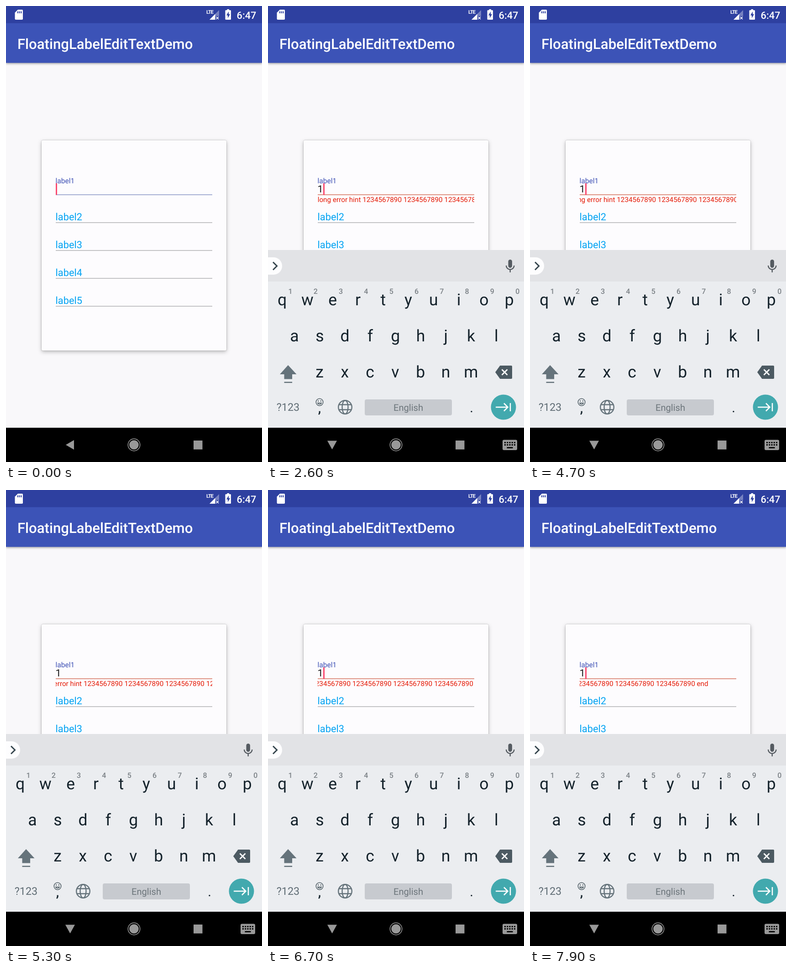
An HTML page that plays this animation: 561x998 px, repeating every 8 s.

```html
<!DOCTYPE html>
<html lang="en">
<head>
<meta charset="utf-8">
<title>Floating label demo</title>
<style>
  html, body { margin: 0; width: 100%; height: 100%; overflow: hidden; background: #f9f8fa; }
  svg { display: block; width: 561px; height: 998px; }
  text { font-family: Roboto, "Noto Sans", sans-serif; text-rendering: geometricPrecision; white-space: pre; }
  .bar { filter: drop-shadow(0 2px 2px rgba(0, 0, 0, .32)); }
  .card { filter: drop-shadow(0 0 1px rgba(0, 0, 0, .28)) drop-shadow(0 3px 4px rgba(0, 0, 0, .25)); }
  .mid { text-anchor: middle; }
  .line { fill: none; stroke-width: 2; }
</style>
</head>
<body>
<svg viewBox="0 0 561 998">
  <defs>
    <clipPath id="hintClip"><rect x="108.5" y="413" width="343.5" height="24"/></clipPath>
    <clipPath id="boardClip"><rect y="500" width="561" height="423"/></clipPath>
  </defs>
  <rect width="561" height="998" fill="#f9f8fa"/>

  <rect class="bar" width="561" height="124.5" fill="#3c53b7"/>
  <rect width="561" height="37.5" fill="#2e40a0"/>
  <text x="24.9" y="93.5" font-size="31.17" font-weight="500" fill="#fff">FloatingLabelEditTextDemo</text>

  <g id="status" fill="#fff">
    <path d="M26 8H35Q37 8 37 10V28Q37 30 35 30H21.500Q19.500 30 19.500 28V14.500Z"/>
    <path d="M26 11.500V16M29.700 11.500V16M33.400 11.500V16" stroke="#2e40a0" stroke-width="2"/>
    <text x="439" y="17.300" font-size="11" font-weight="700" letter-spacing="-.9">LTE</text>
    <path d="M446 30L467 9V22H459V30Z" opacity=".35"/>
    <path d="M446 30L458.500 17.500V30Z"/>
    <path d="M460.500 23.500L466 29M466 23.500L460.500 29" stroke="#fff" stroke-width="1.700"/>
    <path d="M484.500 7H489V9H491.500Q493 9 493 10.500V28.500Q493 30 491.500 30H482Q480.500 30 480.500 28.500V10.500Q480.500 9 482 9H484.500Z"/>
    <path d="M488 12L483 20.500H486V26.500L491 18H488Z" fill="#2e40a0"/>
    <text x="505.500" y="27.500" font-size="21.8" font-weight="500">6:47</text>
  </g>

  <rect class="card" x="78" y="294" width="405" height="460" rx="3" fill="#fdfcfe"/>
  <text x="108.500" y="387.700" font-size="15.58" fill="#3f51b5">label1</text>
  <rect id="rule" x="109" y="412.300" width="343" height="1.600"/>
  <g id="fields"></g>
  <text id="typed" x="108.500" y="408.300" font-size="21.8" fill="#151515">1</text>
  <g clip-path="url(#hintClip)">
    <text id="hint" y="429" font-size="15.28" fill="#e51c08"></text>
  </g>
  <rect id="caret" y="388" width="3" height="25.500" fill="#fa4a70"/>

  <g clip-path="url(#boardClip)">
    <g id="board">
      <rect y="534" width="561" height="470" fill="#ebedf0"/>
      <rect y="534" width="561" height="69" fill="#e2e3e6"/>
      <path d="M0 550H12A19 19 0 0 1 12 588H0Z" fill="#fdfdfe"/>
      <path class="line" d="M11 560.500L19.500 569L11 577.500" stroke="#37474f" style="stroke-width:3"/>
      <rect x="526.500" y="555" width="8.400" height="18" rx="4.200" fill="#555b61"/>
      <path class="line" d="M522 568A8.700 8.700 0 0 0 539.400 568M530.700 576.500V583" stroke="#555b61" style="stroke-width:2.400"/>
      <g id="keys" class="mid" font-size="35.5" fill="#14222b"></g>
      <g id="digits" class="mid" font-size="16" font-weight="500" fill="#7b8186"></g>

      <path d="M44 786L62.500 806H53V816.500H35.500V806H26Z" fill="#65737b"/>
      <rect x="35.500" y="822.500" width="17.500" height="2.500" fill="#65737b"/>
      <path d="M508.500 787H533Q535 787 535 789V814Q535 816 533 816H508.500L498 801.500Z" fill="#4c5a62"/>
      <path class="line" d="M512.500 795.500L524.500 807.500M524.500 795.500L512.500 807.500" stroke="#fff" style="stroke-width:2.800"/>

      <text class="mid" x="44" y="886.300" font-size="23.3" fill="#5f6c74">?123</text>
      <g class="line" stroke="#4c5a62" style="stroke-width:1.500">
        <circle cx="113" cy="867" r="7.800"/>
        <path d="M108.800 868.800A4.600 4.600 0 0 0 117.200 868.800Z"/>
        <path d="M110.200 863.200V865.800M115.800 863.200V865.800" style="stroke-width:2"/>
      </g>
      <text class="mid" x="113" y="890" font-size="29" font-weight="500" fill="#14222b">,</text>
      <g class="line" stroke="#65737b" style="stroke-width:2.400">
        <circle cx="169" cy="878" r="14.800"/>
        <ellipse cx="169" cy="878" rx="6.500" ry="14.800"/>
        <path d="M155.500 872.500H182.500M155.500 883.500H182.500"/>
      </g>
      <rect x="212" y="861" width="191" height="35" rx="4" fill="#c7cacf"/>
      <text class="mid" x="307.500" y="886" font-size="20.1" fill="#6c757b">English</text>
      <text class="mid" x="446" y="889" font-size="29" fill="#14222b">.</text>
      <circle cx="516" cy="878" r="27.500" fill="#42a9ae"/>
      <path class="line" d="M499 878H525M517 869.500L525.500 878L517 886.500M531 869V887" stroke="#fff" style="stroke-width:2.500"/>
    </g>
  </g>

  <rect y="923" width="561" height="75"/>
  <g fill="#999">
    <path id="back" d="M131 960.500L149 950V971Z"/>
    <path id="hide" d="M130 951.500H151L140.500 970.500Z"/>
    <circle cx="280.500" cy="960.500" r="10.300"/>
    <circle class="line" cx="280.500" cy="960.500" r="13.200" stroke="#999" style="stroke-width:1.500"/>
    <rect x="411" y="951" width="19.500" height="19.500"/>
    <g id="picker">
      <rect x="514" y="949.500" width="32" height="22.500" rx="3"/>
      <path d="M518 955.500H542M518 960.500H542" stroke="#000" stroke-width="3" stroke-dasharray="3 2.250"/>
      <rect x="523.500" y="965.300" width="13" height="2.800" fill="#000"/>
    </g>
  </g>
</svg>
<script>
const LOOP = 8000, STEP = 100;
const NAV = 2200, TYPE = 2600;
const SCROLL = { start: 3480, span: 11950, dist: 664 };
// Times at which the caret turns on or off; it starts on.
const BLINKS = [300, 800, 1300, 1800, 3100];
for (let t = 3700; t < LOOP; t += 500) BLINKS.push(t);

const $ = id => document.getElementById(id);
function add(parent, tag, attrs, text = "") {
  const el = document.createElementNS("http://www.w3.org/2000/svg", tag);
  for (const k in attrs) el.setAttribute(k, attrs[k]);
  el.textContent = text;
  $(parent).append(el);
}
const show = (id, on) => { $(id).style.display = on ? "" : "none"; };

for (let i = 0; i < 4; i++) {
  const y = 474 + i * 61;
  add("fields", "text", { x: 108.5, y: y - 5, "font-size": 21.8, fill: "#03a3f2" }, "label" + (i + 2));
  add("fields", "rect", { x: 109, y: y - 0.7, width: 343, height: 1.6, fill: "#b6b6b9" });
}

[["qwertyuiop", 31, 655], ["asdfghjkl", 58, 734], ["zxcvbnm", 113, 813]].forEach(([row, x, y]) =>
  [...row].forEach((c, i) => add("keys", "text", { x: x + i * 55.3, y }, c)));
[..."1234567890"].forEach((c, i) => add("digits", "text", { x: 49 + i * 55.3, y: 629.5 }, c));

$("hint").textContent = "long error hint " + "1234567890 ".repeat(4) + "end";

function draw(t) {
  const typed = t >= TYPE, nav = t >= NAV;
  show("back", !nav);
  show("hide", nav);
  show("picker", nav);
  show("typed", typed);
  show("hint", typed);
  $("rule").setAttribute("fill", typed ? "#d77a68" : "#929dcb");

  $("caret").setAttribute("x", typed ? 121 : 109);
  show("caret", BLINKS.filter(b => b <= t).length % 2 === 0);

  const p = Math.min(Math.max((t - NAV) / 300, 0), 1);
  const left = 1 - p;
  $("board").setAttribute("transform", `translate(0 ${78 * left ** 5})`);
  $("board").setAttribute("opacity", 1 - left ** 3);

  const q = Math.min(Math.max((t - SCROLL.start) / SCROLL.span, 0), 1);
  $("hint").setAttribute("x", 108.7 - SCROLL.dist * (1 - Math.cos(Math.PI * q)) / 2);
}

const begin = performance.now();
function tick() {
  const t = (performance.now() - begin) % LOOP;
  draw(Math.floor(t / STEP) * STEP);
  requestAnimationFrame(tick);
}
tick();
</script>
</body>
</html>
```
